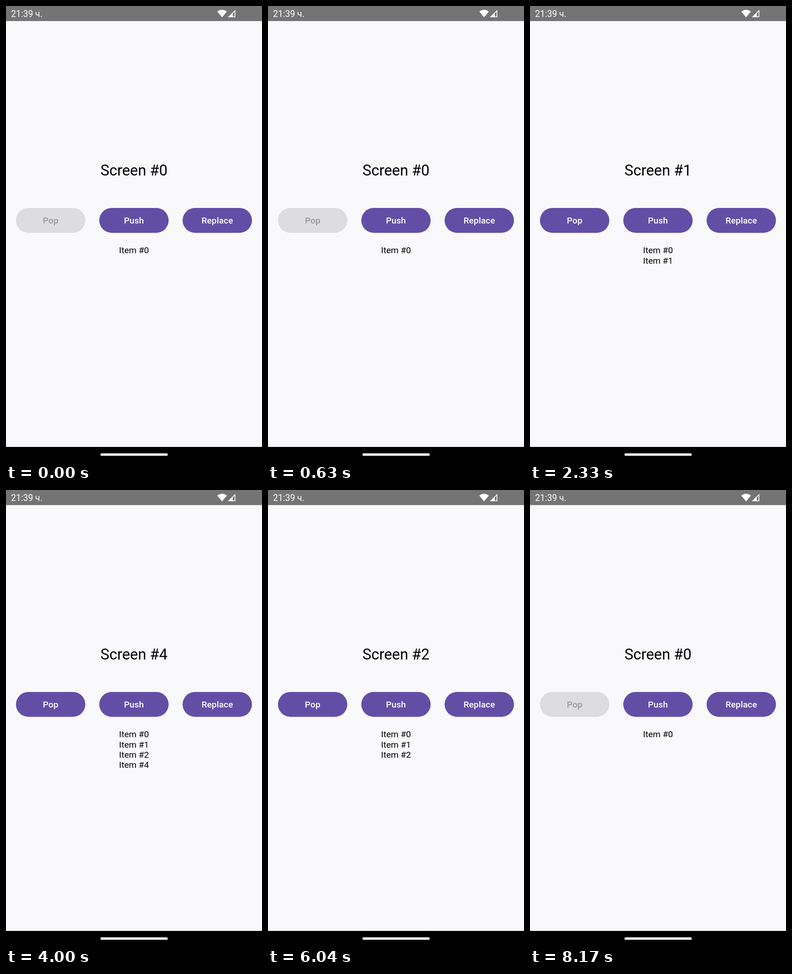
These frames come from a looping animation (561x998 px, 8.21 s). An HTML page:

```html
<!DOCTYPE html>
<html lang="en">
<head>
<meta charset="utf-8">
<title>Screen stack</title>
<style>
  html, body { margin: 0; width: 100%; height: 100%; overflow: hidden; background: #f9f9fb; }
  svg { display: block; width: 561px; height: 998px; font-family: Roboto, sans-serif; font-size: 19.1px; }
  .mid { text-anchor: middle; }
  .button { fill: #634ea6; }
  .label { fill: #fff; font-weight: 500; letter-spacing: .1px; text-anchor: middle; }
  .off .button { fill: #dddde0; }
  .off .label { fill: #98979a; }
</style>
</head>
<body>
<svg viewBox="0 0 561 998">
  <rect width="561" height="998" fill="#f9f9fb"/>
  <rect width="561" height="33" fill="#747474"/>
  <g fill="#fff">
    <text x="11" y="24" font-size="19.4">21:39 ч.</text>
    <path d="M463 12.2Q473.5 4.2 484 12.2L473.5 24.8Z"/>
    <path fill-rule="evenodd" d="M486 24.5L502.5 8.5V24.5ZM497 16.3V22.8H500.8V12.6Z"/>
  </g>
  <text id="title" class="mid" x="280.5" y="371" font-size="32.76"></text>
  <g id="buttons"></g>
  <g id="items"></g>
  <rect y="965" width="561" height="33" fill="#000"/>
  <rect x="207" y="979" width="147.5" height="5.6" rx="2.8" fill="#f0f0f0"/>
</svg>
<script>
const LOOP = 8210;
const LINE = 22.35;

// Start time in ms and the stack shown from then on
const steps = [
  [0, [0]],
  [1750, [0, 1]],
  [2550, [0, 1, 2]],
  [3150, [0, 1, 2, 3]],
  [3750, [0, 1, 2, 4]],
  [5400, [0, 1, 2]],
  [6450, [0, 1]],
  [7250, [0]]
];

const byId = id => document.getElementById(id);
const title = byId('title');
const buttons = byId('buttons');
const items = byId('items');

buttons.innerHTML = ['Pop', 'Push', 'Replace'].map((name, i) => {
  const x = 21.8 + i * 182.6;
  return `<g><rect class="button" x="${x}" y="442" width="152" height="54.4" rx="27.2"/>
    <text class="label" x="${x + 76}" y="476">${name}</text></g>`;
}).join('');

function show(stack) {
  title.textContent = `Screen #${stack[stack.length - 1]}`;
  buttons.firstElementChild.classList.toggle('off', stack.length === 1);
  items.innerHTML = stack.map((n, i) =>
    `<text class="mid" x="280.5" y="${541.4 + i * LINE}">Item #${n}</text>`).join('');
}

let current = null;
const start = performance.now();

function draw() {
  const t = (performance.now() - start) % LOOP;
  const step = steps.filter(([from]) => from <= t).pop();
  if (step !== current) {
    current = step;
    show(step[1]);
  }
  requestAnimationFrame(draw);
}
draw();
</script>
</body>
</html>
```
